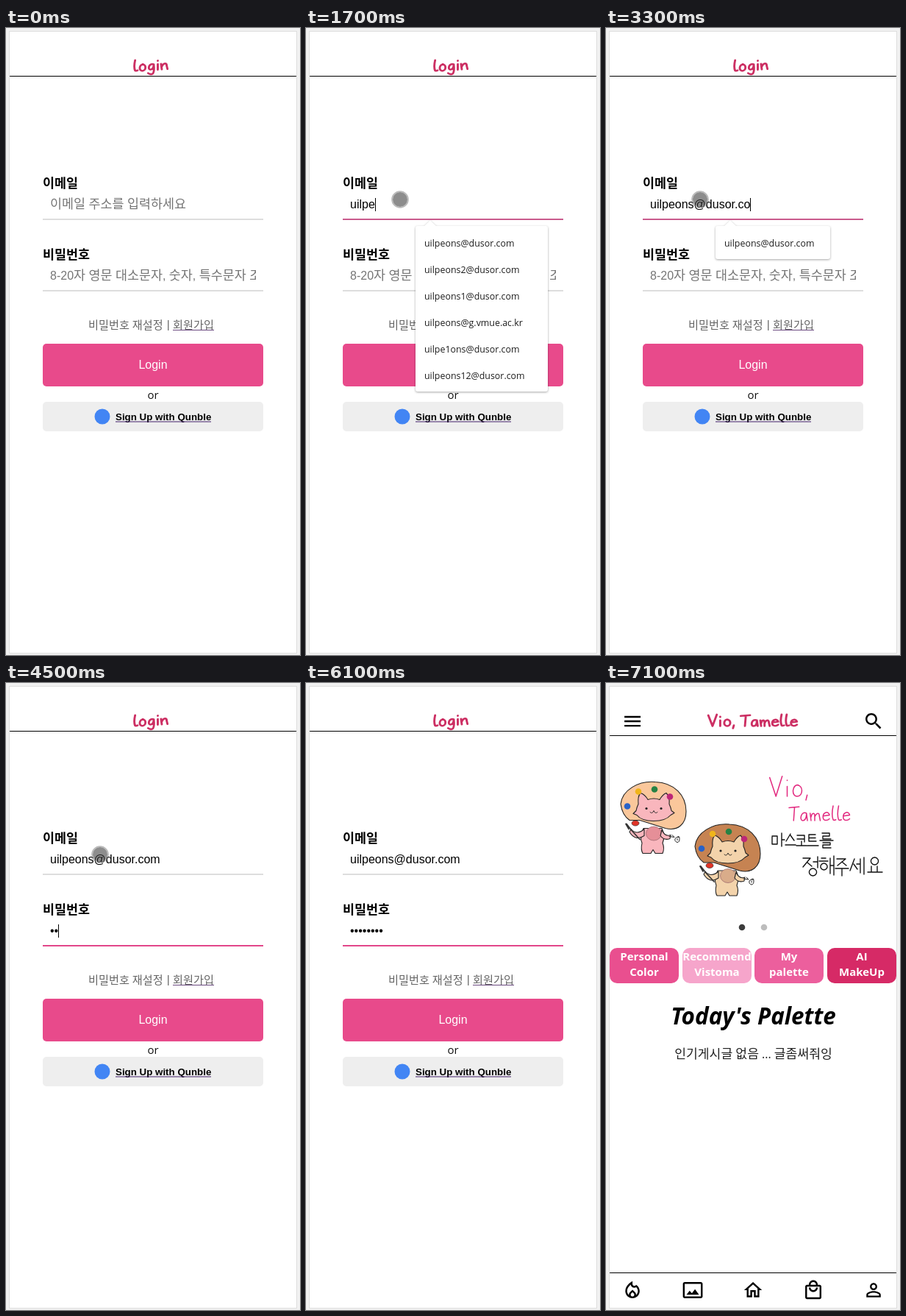
An HTML page for the animation above (7200 ms loop, 400 by 852 pixels).

```html
<!DOCTYPE html>
<html lang="ko">
<head>
<meta charset="utf-8">
<title>Login</title>
<style>
html, body { margin: 0; width: 100%; height: 100%; overflow: hidden; background: #f1f1f1; }
svg { display: block; width: 400px; height: 852px; }
text { white-space: pre; }
.a { font-family: "Liberation Sans", Arial, "Noto Sans CJK KR", "Noto Sans CJK", sans-serif; }
.s { font-family: "Open Sans", "Noto Sans CJK KR", "Noto Sans CJK", sans-serif; }
.b { font-weight: 700; }
.m { text-anchor: middle; }
.pop { filter: drop-shadow(0 1px 1.5px rgba(0, 0, 0, .35)); }
</style>
</head>
<body>
<svg id="stage" viewBox="0 0 400 852"></svg>
<script>
const LOOP = 7200, STEP = 100;
const PINK = '#e84a8b';
const stage = document.getElementById('stage');

// Hangul runs are set slightly larger than the Latin around them.
const ko = (s, size) => s.replace(/[가-힣]+/g, m => `<tspan font-size="${(size * 1.087).toFixed(1)}">${m}</tspan>`);
const text = (x, y, s, size, cls, fill = '#000', extra = '') =>
  `<text x="${x}" y="${y}" class="${cls}" font-size="${size}" fill="${fill}" ${extra}>${ko(s, size)}</text>`;
const rect = (x, y, w, h, fill, r = 0, id = '') =>
  `<rect ${id && `id="${id}"`} x="${x}" y="${y}" width="${w}" height="${h}" rx="${r}" fill="${fill}"/>`;
const dot = (x, y, r, fill) => `<circle cx="${x}" cy="${y}" r="${r}" fill="${fill}"/>`;
const stroke = (d, color, w) =>
  `<path d="${d}" fill="none" stroke="${color}" stroke-width="${w}" stroke-linecap="round" stroke-linejoin="round"/>`;

// Hand lettering: advance and pen path of each letter.
const PEN = {
  l: [6, 'M2-16Q0-6 2-1Q3 0 5-1'],
  o: [11, 'M6-9C1-10 0 0 5 0C10 0 10-9 5-9'],
  g: [11, 'M8-8C2-11 0-1 4-1C7-1 8-5 8-8Q9 2 7 5Q4 7 1 4'],
  i: [5, 'M2-8L2 0M2-13V-12.6'],
  n: [11, 'M1-8L2 0M2-4C4-10 8-9 8-5L9 0'],
  V: [13, 'M1-15L6 0L11-16'],
  T: [11, 'M0-14L11-15M6-14L5 0'],
  a: [11, 'M8-8C2-11 0 0 4 0C7 0 8-4 8-8L9 0'],
  m: [14, 'M1-8L2 0M2-4C3-9 6-9 6-5V0M6-4C8-9 11-9 11-5L12 0'],
  e: [10, 'M1-5L8-6C7-11 1-9 1-4C1 1 6 0 8-2'],
  ',': [5, 'M2-1L1 3'],
  ' ': [5, '']
};
function lettering(s, x, y, k, color, w, ky = k, tilt = 0) {
  let pos = 0, out = '';
  for (const c of s) {
    const [adv, d] = PEN[c];
    if (d) out += `<g transform="translate(${pos} 0)">${stroke(d, color, w / k)}</g>`;
    pos += adv;
  }
  return `<g transform="translate(${x} ${y}) skewY(${tilt}) scale(${k} ${ky})">${out}</g>`;
}

const icon = (x, y, d) => `<path transform="translate(${x - 14.6} ${y - 14.6}) scale(1.22)" d="${d}"/>`;

function mascot(x, y, hat, skin, belly) {
  const line = 'stroke="#222" stroke-width="1.1" stroke-linejoin="round"';
  return `<g transform="translate(${x} ${y})">
    <path d="M31 63Q25 74 29 83Q27 92 30 97H41L44 92L47 97H57Q60 90 57 83Q61 73 56 63Z" fill="${skin}" ${line}/>
    <ellipse cx="45" cy="70" rx="10.5" ry="9.5" fill="${belly}" stroke="#99646a" stroke-width=".7"/>
    <path d="M32 64Q22 73 14 64L12 68Q20 81 32 73ZM56 65Q60 75 68 72L67 77Q59 80 54 73Z" fill="${skin}" ${line}/>
    <path d="M26 52H12Q2 45 0 30C2 11 24-2 47 0C73 1 89 18 89 40C89 58 77 67 61 63Z" fill="${hat}" ${line}/>
    <path d="M24 30Q23 19 27 15Q33 17 37 24Q45 21 53 24Q57 17 62 15Q67 20 66 30Q68 34 69 39L73 42L68 45Q61 53 45 53Q28 53 22 45L17 43L21 39Q22 34 24 30Z" fill="${skin}" ${line}/>
    ${dot(24, 13, 4.3, '#f0b51b') + dot(46, 10, 4.3, '#268244') + dot(67, 20, 4.3, '#bd2777') + dot(9, 33, 4.3, '#2862c8')}
    <ellipse cx="20" cy="56" rx="5" ry="3.6" fill="#e03428" stroke="#222" stroke-width=".6"/>
    ${dot(35, 36, 1.6, '#222') + dot(55, 36, 1.6, '#222')}
    ${stroke('M40 41Q43 44 45 39Q47 44 50 41', '#222', .9)}
    ${stroke('M8 57L15 66L26 78M7 57L11 64', '#333', 1.7)}
    ${stroke('M66 74L73 75L70 72M77 75Q80 72 80 77Q80 82 77 82Q73 81 74 77Q76 74 79 75M77 77V79', '#222', 1)}
  </g>`;
}

const HANGUL = 'M226 209V219H233V208H226M239 204V222M239 213H243' +
  'M251 205L245 215M251 207L256 214M244 220H258' +
  'M260 207H270V216M260 212H269M266 215V220M259 221H273' +
  'M285 206H276V215H286M276 210.5H285M274 221H289' +
  'M294 204H304V208H295V212H306M291 214H309M295 217H305V220H295V224H306' +
  'M268 238H278L268 250M274 244L280 249M288 236V251M282 243H288M281 252a5 5 0 1 0 1 0' +
  'M293 238H299M290 242H302M296 245a4.5 4.5 0 1 0 1 0M305 238V259M305 248H310M310 235V261' +
  'M314 239H326L315 248M321 243L327 248M312 252H330M321 252V262' +
  'M338 239L332 255M337 246L342 253M341 246H346M346 239V258M351 237V260' +
  'M365 237a5 5 0 1 0 1 0M361 249V256M369 249V256M356 257H376';

const tile = (x, fill, a, b) => rect(x, 360, 94, 48, fill, 10) +
  text(x + 47, 377, a, 15, 's b m', '#fff') + text(x + 47, 398, b, 15, 's b m', '#fff');

const loginPage = `<g id="login">
  ${rect(5, 65, 390, 1, '#000')}
  ${lettering('login', 173.5, 59, 1.1, '#cc2f63', 2.9, .95, -4)}
  ${text(50, 216.5, '이메일', 16, 'a b')}
  ${text(60, 245, '이메일 주소를 입력하세요', 16, 'a', '#757575', 'id="mailHint"')}
  ${text(60, 245, '', 16, 'a', '#000', 'id="mail"')}
  ${rect(50, 259, 300, 2, '#ddd', 0, 'mailLine')}
  ${text(50, 313.5, '비밀번호', 16, 'a b')}
  <g clip-path="url(#field)">${text(60, 342, '8-20자 영문 대소문자, 숫자, 특수문자 조합', 16, 'a', '#757575', 'id="passHint"')}</g>
  ${text(60, 342, '', 16, 'a', '#000', 'id="pass"')}
  ${rect(50, 356, 300, 2, '#ddd', 0, 'passLine')}
  ${rect(60, 231, 1, 18, '#000', 0, 'caret')}
  ${text(112, 409, '비밀번호 재설정', 14, 'a', '#666')}
  ${text(219, 408, '|', 14, 'a', '#555')}
  ${text(227, 409, '회원가입', 14, 'a', '#666')}
  ${rect(227, 410, 56, 1, '#6b4a80')}
  ${rect(50, 429, 300, 58, PINK, 5)}
  ${text(200, 463, 'Login', 16, 'a m', '#fff')}
  ${text(200, 504, 'or', 15, 's m', '#111')}
  ${rect(50, 508, 300, 40, '#eee', 5)}
  ${dot(131, 528, 10.5, '#4285f4')}
  ${text(149, 533, 'Sign Up with Qunble', 13.33, 'a b')}
  ${rect(149, 534.5, 130, 1, '#43206b')}
  <g id="popup" class="pop"><path id="box" fill="#fff"/><g id="items"></g></g>
  <g id="touch">
    <circle cx="128" cy="233" r="10" fill="#333" fill-opacity=".56"/>
    <circle cx="128" cy="233" r="10.9" fill="none" stroke="#777" stroke-opacity=".5" stroke-width="1.8"/>
  </g>
</g>`;

const homePage = `<g id="home">
  ${rect(5, 71, 390, 1, '#000')}
  ${icon(36, 52, 'M3 18h18v-2H3zM3 13h18v-2H3zM3 6v2h18V6z')}
  ${icon(364, 52, 'M15.5 14h-.79l-.28-.27C15.41 12.59 16 11.11 16 9.5 16 5.91 13.09 3 9.5 3S3 5.91 3 9.5 5.91 16 9.5 16c1.61 0 3.09-.59 4.23-1.57l.27.28v.79l5 4.99L20.49 19zm-6 0C7.01 14 5 11.99 5 9.5S7.01 5 9.5 5 14 7.01 14 9.5 11.99 14 9.5 14z')}
  ${lettering('Vio, Tamelle', 138, 58.5, 1.16, '#cc2f63', 2.9, .98)}
  ${mascot(20, 134.5, '#fac79b', '#f9b6bd', '#e58f98')}
  ${mascot(121, 192, '#c68352', '#f3d3ab', '#d9ac8a')}
  ${lettering('Vio,', 221, 154, 1.7, '#e2297f', 1.5)}
  ${lettering('Tamelle', 249, 187, 1.25, '#e2297f', 1.5)}
  ${stroke(HANGUL, '#111', 1.4)}
  ${dot(185, 332, 4.3, '#3c3c3c') + dot(215, 332, 4.3, '#bdbdbd')}
  ${tile(5, '#e94f8f', 'Personal', 'Color')}
  ${tile(104, '#f6a5cb', 'Recommend', 'Vistoma')}
  ${tile(202, '#ec5f9d', 'My', 'palette')}
  ${tile(301, '#d62a66', 'AI', 'MakeUp')}
  ${text(200.5, 464, "Today's Palette", 31.4, 's b m', '#000', 'font-style="italic"')}
  ${text(200.5, 510, '인기게시글 없음 ... 글좀써줘잉', 15.8, 's m', '#222')}
  ${rect(5, 801, 390, 1, '#000')}
  ${icon(36, 825, 'M16 6l-.44.55C14.38 8.02 12 7.19 12 5.3V2S4 6 4 13c0 4.42 3.58 8 8 8s8-3.58 8-8C20 10.04 18.39 7.38 16 6zM12 19c-1.1 0-2-.87-2-1.94 0-.51.2-.99.58-1.36L12 14.3l1.43 1.4c.37.37.57.85.57 1.36C14 18.13 13.1 19 12 19zM15.96 17.5c.04-.36.22-1.89-1.13-3.22L12 11.5l-2.83 2.78C7.81 15.62 8 17.16 8.04 17.5 6.79 16.4 6 14.79 6 13c0-3.16 2.13-5.65 4.03-7.25.23 1.99 1.93 3.55 3.99 3.55.78 0 1.54-.23 2.18-.66C17.34 9.78 18 11.35 18 13c0 1.79-.79 3.4-2.04 4.5z')}
  ${icon(118, 825, 'M21 3H3c-1.1 0-2 .9-2 2v14c0 1.1.9 2 2 2h18c1.1 0 2-.9 2-2V5c0-1.1-.9-2-2-2zm0 16H3V5h18zM8.5 12.5l2.5 3.01L14.5 11l4.5 6H5z')}
  ${icon(200, 825, 'M12 5.69l5 4.5V18h-2v-6H9v6H7v-7.81l5-4.5M12 3L2 12h3v8h6v-6h2v6h6v-8h3z')}
  ${icon(282, 825, 'M19 6h-2c0-2.76-2.24-5-5-5S7 3.24 7 6H5c-1.1 0-2 .9-2 2v12c0 1.1.9 2 2 2h14c1.1 0 2-.9 2-2V8c0-1.1-.9-2-2-2zm-7-3c1.66 0 3 1.34 3 3H9c0-1.66 1.34-3 3-3zm7 17H5V8h14v12zm-7-8c-1.66 0-3-1.34-3-3H7c0 2.76 2.24 5 5 5s5-2.24 5-5h-2c0 1.66-1.34 3-3 3z')}
  ${icon(364, 825, 'M12 5.9c1.16 0 2.1.94 2.1 2.1s-.94 2.1-2.1 2.1S9.9 9.16 9.9 8s.94-2.1 2.1-2.1m0 9c2.97 0 6.1 1.46 6.1 2.1v1.1H5.9V17c0-.64 3.13-2.1 6.1-2.1M12 4C9.79 4 8 5.79 8 8s1.79 4 4 4 4-1.79 4-4-1.79-4-4-4zm0 9c-2.67 0-8 1.34-8 4v3h16v-3c0-2.66-5.33-4-8-4z')}
</g>`;

stage.innerHTML = `<defs><clipPath id="field">${rect(60, 322, 280, 30, '#000')}</clipPath></defs>
  ${rect(0, 0, 400, 852, '#f1f1f1')}
  <rect x="4.5" y="4.5" width="391" height="845" fill="#fff" stroke="#dedede"/>
  ${loginPage}${homePage}`;

const el = {};
stage.querySelectorAll('[id]').forEach(n => el[n.id] = n);
const show = (n, on) => n.setAttribute('display', on ? 'inline' : 'none');

const USER = 'uilpeons', HOST = '@dusor.com', SCHOOL = '@g.vmue.ac.kr';
const MAIL = USER + HOST;
const RECENT = ['omeli@omeli.com', 'uj@uj.com', MAIL, USER + 2 + HOST, USER + SCHOOL, USER + 1 + HOST];
const SAVED = [MAIL, USER + 2 + HOST, USER + 1 + HOST, USER + SCHOOL, 'uilpe1ons' + HOST, USER + 12 + HOST];

// Timeline in ms
const TOUCH_IN = 400, FOCUS = 700, MAIL_AT = 1150, MAIL_GAP = 130;
const POPUP_OUT = 3700, NEXT_FIELD = 3800, PASS_AT = 4200, PASS_GAP = 190;
const TOUCH_OUT = 5300, HOME = 6700;

const typed = (t, start, gap, max) => t < start ? 0 : Math.min(max, Math.floor((t - start) / gap) + 1);

function drawPopup(prefix) {
  const list = prefix ? SAVED.filter(s => s.startsWith(prefix)) : RECENT;
  const wide = list.includes(USER + 12 + HOST);
  const right = 149 + (list.length === 1 ? 156 : wide ? 180 : 168);
  const bottom = 278 + 36 * list.length;
  el.box.setAttribute('d', `M152 269H161L169 261.5L177 269H${right - 3}q3 0 3 3V${bottom - 3}q0 3-3 3H152q-3 0-3-3V272q0-3 3-3Z`);
  el.items.innerHTML = list.map((s, i) => text(161, 297 + 36 * i, s, 12.4, 's', '#1c1c1c')).join('');
}

function draw(time) {
  const t = Math.floor(time / STEP) * STEP;
  show(el.login, t < HOME);
  show(el.home, t >= HOME);
  if (t >= HOME) return;

  const n = typed(t, MAIL_AT, MAIL_GAP, MAIL.length);
  const p = typed(t, PASS_AT, PASS_GAP, 8);
  const inMail = t >= FOCUS && t < NEXT_FIELD, inPass = t >= NEXT_FIELD;
  el.mail.textContent = MAIL.slice(0, n);
  el.pass.textContent = '•'.repeat(p);
  show(el.mailHint, !n);
  show(el.passHint, !p);
  el.mailLine.setAttribute('fill', inMail ? '#c95b8d' : '#ddd');
  el.passLine.setAttribute('fill', inPass ? '#e2478a' : '#ddd');

  const last = inPass ? (p ? PASS_AT + (p - 1) * PASS_GAP : NEXT_FIELD)
                      : (n ? MAIL_AT + (n - 1) * MAIL_GAP : FOCUS);
  show(el.caret, (inMail || inPass) && (t - last) % 1000 < 500);
  const line = inPass ? el.pass : el.mail;
  const width = (inPass ? p : n) ? line.getComputedTextLength() : 0;
  el.caret.setAttribute('x', Math.round(60 + width));
  el.caret.setAttribute('y', inPass ? 328 : 231);

  const open = t >= FOCUS && t < POPUP_OUT;
  show(el.popup, open);
  if (open) drawPopup(MAIL.slice(0, n));
  show(el.touch, t >= TOUCH_IN && t < TOUCH_OUT);
}

const start = performance.now();
function tick() {
  draw((performance.now() - start) % LOOP);
  requestAnimationFrame(tick);
}
tick();
</script>
</body>
</html>
```
